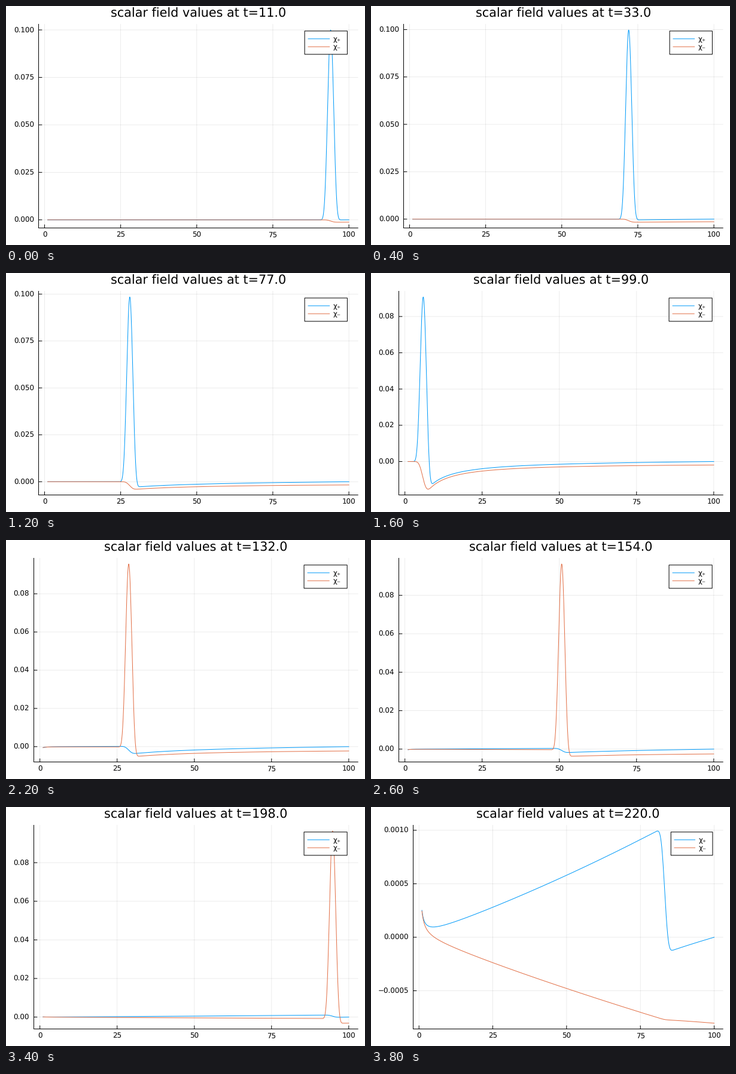
A matplotlib script for the animation above (4000 ms loop, 600 by 400 pixels).

```python
import math

import matplotlib.pyplot as plt
import numpy as np
from matplotlib.animation import FuncAnimation
from matplotlib.patches import Rectangle

W, H, DPI = 600, 400, 100
FRAMES, T_STEP = 20, 11
BLUE, RED = "#009af9", "#e26f46"
TOP, BOTTOM, RIGHT = 30.5, 371.5, 588.2
TICK_SIZE, TITLE_SIZE = 11.85, 20.75

plt.rcParams["font.family"] = "DejaVu Sans"
plt.rcParams["text.hinting"] = "none"


def pt(px):
    return px * 72 / DPI


def pulse(t):
    """Ingoing signal fed in at the outer edge."""
    return 0.1 * max(0.0, 1 - ((t - 5) / 4) ** 2) ** 8


# Spherical wave equation in characteristic form, marched along the light
# rays: plus moves inward, minus moves outward, coupled through 1/r.
def simulate(h=0.05, delay=5, loss=0.02):
    r = np.linspace(1, 100, round(99 / h) + 1)
    a = h / 2 / r
    plus, minus = np.zeros_like(r), np.zeros_like(r)
    inner = [0.0] * delay
    per_frame = round(T_STEP / h)
    states = []
    for n in range(1, FRAMES * per_frame + 1):
        from_right = np.append((plus + a * minus)[1:], 0)
        from_left = np.append(0, (minus - a * plus)[:-1])
        plus = (from_right + a * from_left) / (1 + a * a)
        plus[-1] = pulse(n * h)
        minus = from_left - a * plus
        # slightly delayed and lossy reflection at the inner edge
        minus[0] = (1 - loss) * inner[-delay]
        plus[0] = from_right[0] + a[0] * minus[0]
        inner.append(plus[0])
        if n % per_frame == 0:
            states.append((plus, minus))
    return r, states


r, states = simulate()

fig = plt.figure(figsize=(W / DPI, H / DPI), dpi=DPI, facecolor="white")
ax = fig.add_axes([0, 0, 1, 1])


def line(xs, ys, color="black", width=1.0, **kw):
    ax.plot(xs, ys, color=color, lw=pt(width), snap=False, **kw)


def grid_line(xs, ys):
    line(xs, ys, width=0.75, alpha=0.1, zorder=1)


def label(x, y, text, size=TICK_SIZE, ha="center", **kw):
    ax.text(x, y, text, fontsize=pt(size), ha=ha, va="baseline", **kw)


def layout(t):
    """Left edge of the plot, tick step and decimals."""
    if t < 90:
        return 54.5, 0.025, 3
    if t < 205:
        return 46.5, 0.02, 2
    return 70.5, 0.0005, 4


def legend(left):
    w = RIGHT - left
    gap, length = w / 90, w / 15
    x1 = RIGHT - w / 30
    x0 = x1 - (3 * gap + length + 17.9)
    y0 = TOP + (BOTTOM - TOP) / 30
    ax.add_patch(Rectangle((x0, y0), x1 - x0, 39, fc="white", ec="black",
                           lw=pt(1), snap=False, zorder=5))
    for y, color, text in ((54.9, BLUE, "χ₊"), (68.2, RED, "χ₋")):
        line([x0 + gap, x0 + gap + length], [y, y], color, zorder=6)
        label(x0 + 2 * gap + length, y + 4.3, text, ha="left", zorder=6)


def draw(k):
    ax.clear()
    ax.set_xlim(0, W)
    ax.set_ylim(H, 0)
    ax.axis("off")

    t = (k + 1) * T_STEP
    left, step, digits = layout(t)
    plus, minus = states[k]
    lo = min(plus.min(), minus.min())
    hi = max(plus.max(), minus.max())
    pad = 0.03 * (hi - lo)
    lo, hi = lo - pad, hi + pad

    def px(x):
        return left + (x + 1.97) / 104.94 * (RIGHT - left)

    def py(y):
        return BOTTOM - (y - lo) / (hi - lo) * (BOTTOM - TOP)

    for v in range(0, 101, 25):
        x = px(v)
        grid_line([x, x], [TOP, BOTTOM])
        line([x, x], [BOTTOM, BOTTOM - 5.3], zorder=2)
        label(x, 387.1, str(v))
    for n in range(math.ceil(lo / step), math.floor(hi / step) + 1):
        y = py(n * step)
        grid_line([left, RIGHT], [y, y])
        line([left, left + 5.3], [y, y], zorder=2)
        text = f"{n * step:.{digits}f}".replace("-", "\u2212")
        label(left - 7.6, y + 4.3, text, ha="right")

    line([left, left], [TOP, BOTTOM], zorder=2)
    line([left, RIGHT], [BOTTOM, BOTTOM], zorder=2)
    line(px(r), py(plus), BLUE, zorder=3)
    line(px(r), py(minus), RED, zorder=4)
    legend(left)
    label((left + RIGHT) / 2, 18.4, f"scalar field values at t={t:.1f}",
          TITLE_SIZE)
    return []


anim = FuncAnimation(fig, draw, frames=FRAMES, interval=200,
                     init_func=lambda: draw(0), repeat=True, repeat_delay=0)
plt.show()
```
